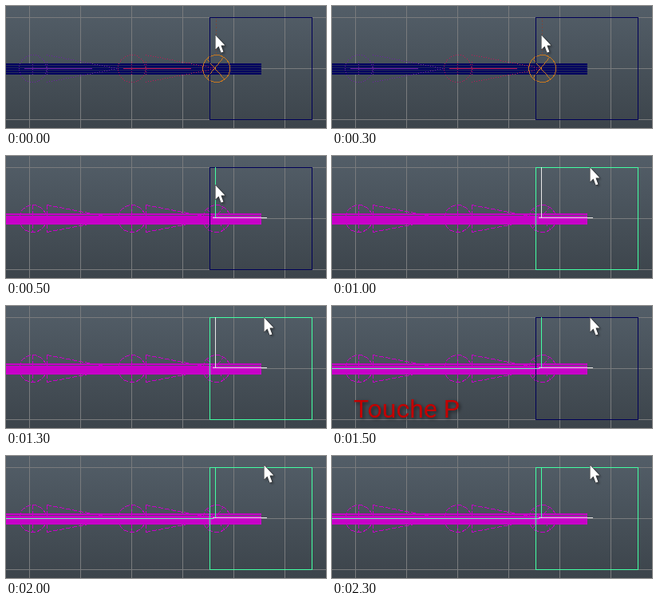
Animation of 401x153 px, one loop 2.5 s. Source, as an HTML page with a canvas:

```html
<!DOCTYPE html>
<html lang="fr">
<head>
<meta charset="utf-8">
<style>
html, body { margin: 0; width: 100%; height: 100%; overflow: hidden; background: #48515a; }
canvas { display: block; }
</style>
</head>
<body>
<canvas id="stage" width="401" height="153"></canvas>
<script>
const ctx = document.getElementById('stage').getContext('2d');
const W = 401, H = 153, STEP = 500;
const AXIS_Y = 78, RADIUS = 17;
const NAVY = '#000058', GREEN = '#43ffa3', WHITE = '#e8e8e8', MAGENTA = '#c800c8';

const STATES = [
  { tip: [262, 36], square: NAVY },
  { tip: [262, 36], square: NAVY, selected: true, up: GREEN },
  { tip: [323, 14], square: GREEN, selected: true, up: WHITE },
  { tip: [323, 14], square: NAVY, selected: true, up: GREEN, axis: true, label: true },
  { tip: [323, 11], square: GREEN, selected: true, up: GREEN, axis: true }
];

const JOINTS = [
  { x: 33, color: '#7020a8', bone: true },
  { x: 157, color: '#c01858', bone: true },
  { x: 263, color: '#c87820' }
];

function rect(x, y, w, h, color) {
  ctx.fillStyle = color;
  ctx.fillRect(x, y, w, h);
}

// Crisp one-pixel curve; dash = [on, off] in steps.
function trace(steps, pointAt, color, [on, off] = [1, 0]) {
  for (let i = 0; i <= steps; i++) {
    if (i % (on + off) >= on) continue;
    const [x, y] = pointAt(i / steps);
    rect(Math.round(x), Math.round(y), 1, 1, color);
  }
}

function line(x1, y1, x2, y2, color, dash) {
  const steps = Math.max(Math.abs(x2 - x1), Math.abs(y2 - y1));
  trace(steps, t => [x1 + (x2 - x1) * t, y1 + (y2 - y1) * t], color, dash);
}

function circle(x, y, r, color, dash) {
  const turn = Math.PI * 2;
  trace(Math.round(r * turn), t => [x + r * Math.cos(t * turn), y + r * Math.sin(t * turn)], color, dash);
}

function background() {
  const shade = ctx.createLinearGradient(0, 0, 0, H);
  shade.addColorStop(0, '#535e68');
  shade.addColorStop(1, '#3c444b');
  ctx.fillStyle = shade;
  ctx.fillRect(0, 0, W, H);
  for (let x = 29; x < W; x += 64) rect(x, 0, 1, H, '#797b7d');
  for (let y = 14; y < H; y += 64) rect(0, y, W, 1, '#797b7d');
}

function joint({ x, color, bone }, selected) {
  const ink = selected ? MAGENTA : color;
  const dash = selected ? [6, 2] : bone ? [1, 2] : [1, 0];
  const reach = selected ? RADIUS : 8;
  circle(x, AXIS_Y, RADIUS, ink, dash);
  if (!bone) {
    line(x - 12, AXIS_Y + 12, x + 9, AXIS_Y - 14, ink, dash);
    line(x - 12, AXIS_Y - 12, x + 10, AXIS_Y + 13, ink, dash);
    if (!selected) line(x, 14, x, 61, '#77483c', [2, 2]);
    return;
  }
  const base = x + RADIUS + 1;
  for (const side of [-RADIUS, RADIUS]) {
    line(base, AXIS_Y + side, base + 88, AXIS_Y, ink, dash);
  }
  line(x, AXIS_Y - reach, x, AXIS_Y + reach, ink, dash);
  line(base, AXIS_Y - reach, base, AXIS_Y + reach, ink, dash);
  if (!selected) line(x - 10, AXIS_Y, x + 74, AXIS_Y, ink);
}

function band(selected) {
  if (selected) {
    rect(0, 72, 320, 14, MAGENTA);
    rect(0, 74, 320, 1, '#57486a');
    return;
  }
  rect(0, 72, 320, 14, '#000060');
  for (let y = 74; y < 86; y += 3) rect(0, y, 320, 1, '#242b58');
}

function cursor([x, y]) {
  const shape = [[0, 0], [0, 18], [4, 14], [7, 22], [10, 21], [7, 13], [12, 13]];
  ctx.save();
  ctx.beginPath();
  shape.forEach(([dx, dy]) => ctx.lineTo(x + dx + 0.5, y + dy + 0.5));
  ctx.closePath();
  ctx.strokeStyle = '#1c1c1c';
  ctx.stroke();
  ctx.shadowColor = 'rgba(0,0,0,.4)';
  ctx.shadowBlur = 3;
  ctx.shadowOffsetX = ctx.shadowOffsetY = 2;
  ctx.fillStyle = '#fff';
  ctx.fill();
  ctx.restore();
}

function label() {
  ctx.save();
  ctx.font = '32px Roboto, sans-serif';
  ctx.fillStyle = '#c40000';
  ctx.shadowColor = 'rgba(0,0,0,.5)';
  ctx.shadowBlur = 4;
  ctx.shadowOffsetX = ctx.shadowOffsetY = 2;
  ctx.fillText('Touche P', 27, 140);
  ctx.restore();
}

function draw(state) {
  background();
  band(state.selected);
  JOINTS.forEach(j => joint(j, state.selected));
  ctx.strokeStyle = state.square;
  ctx.strokeRect(255.5, 14.5, 128, 128);
  if (state.axis) rect(0, AXIS_Y, 260, 1, '#70f8b8');
  if (state.up) {
    rect(262, 14, 1, 64, state.up);
    rect(259, 77, 68, 1, WHITE);
  }
  if (state.label) label();
  cursor(state.tip);
}

function tick(now) {
  draw(STATES[Math.floor(now / STEP) % STATES.length]);
  requestAnimationFrame(tick);
}
tick(0);
</script>
</body>
</html>
```
